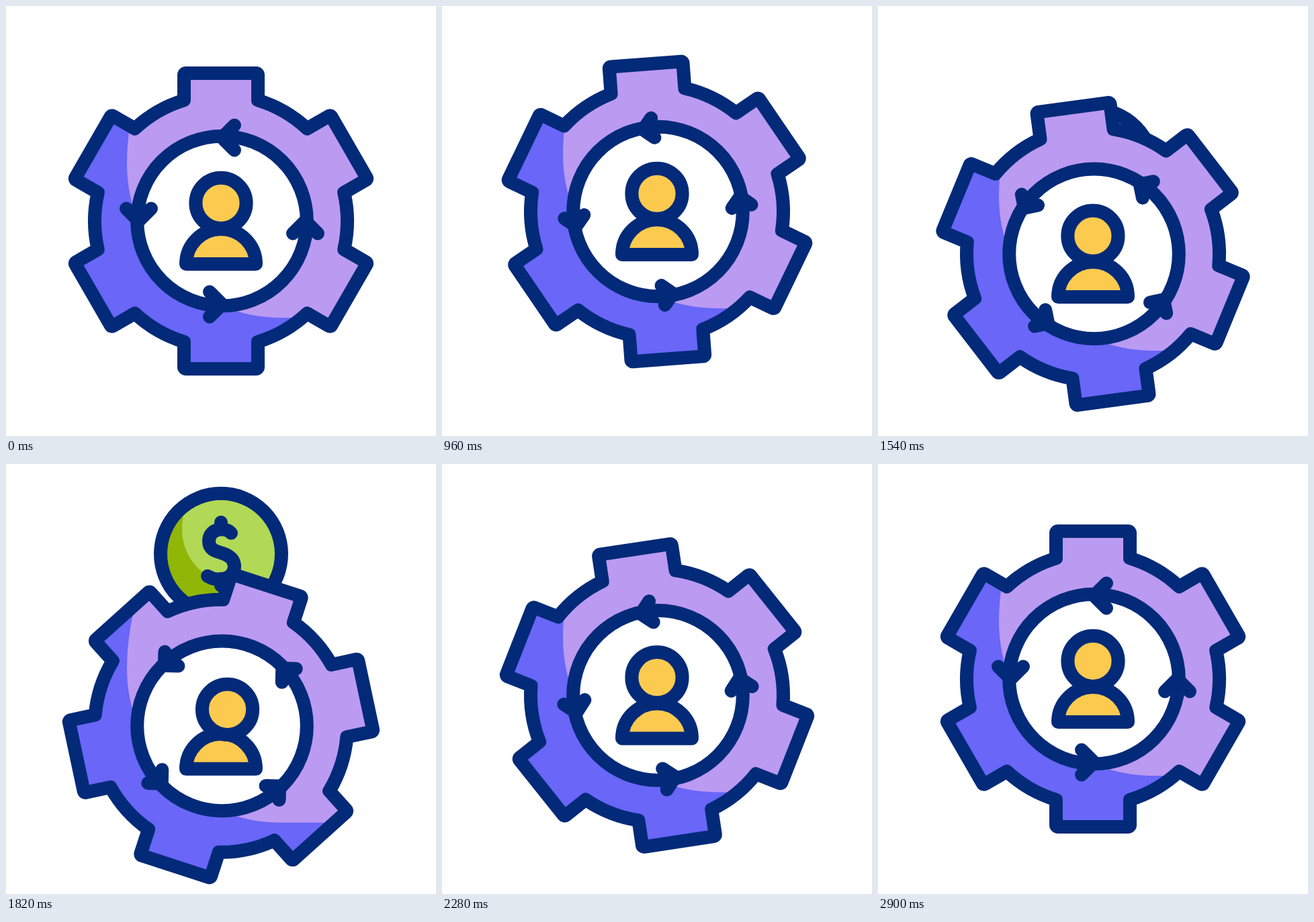
An HTML page with a canvas for the animation above (3280 ms loop, 640 by 640 pixels).

```html
<!DOCTYPE html>
<html lang="en">
<head>
<meta charset="utf-8">
<title>Gear and coin</title>
<style>
html, body { margin: 0; width: 100%; height: 100%; overflow: hidden; background: #fff; }
canvas { display: block; width: 640px; height: 640px; }
</style>
</head>
<body>
<canvas id="stage" width="640" height="640"></canvas>
<script>
const ctx = document.getElementById('stage').getContext('2d');
const LOOP = 3280, TAU = Math.PI * 2, RAD = Math.PI / 180;
const NAVY = '#032a78', LILAC = '#bb9af2', VIOLET = '#6966f8', YELLOW = '#fdca50',
      LIME = '#b1d955', OLIVE = '#90b608';

// Each track is a list of [time in ms, value], eased between entries.
const tracks = {
  y: [[362, 320], [650, 295.5], [2020, 394], [2506, 306], [2900, 320]],
  gear: [[320, 0], [650, 4.8], [2350, -129], [2900, -120]],
  arrows: [[320, 0], [695, 5], [2335, -282.5], [2900, -270]],
  arrowSize: [[320, 18.5], [650, 21.5], [1000, 14.5], [1850, 14.5], [2900, 18.5]],
  headX: [[960, 0], [1290, -9.3], [1800, 9.6], [2240, 0]],
  coinY: [[1240, 320], [1930, 124], [2040, 109], [2380, 320]]
};

function ease(x) {
  let lo = 0, hi = 1, s = x;
  for (let i = 0; i < 18; i++) {
    s = (lo + hi) / 2;
    const r = 1 - s;
    if (1.26 * s * r * r + 1.74 * s * s * r + s * s * s < x) lo = s; else hi = s;
  }
  return s * s * (3 - 2 * s);
}

function valueAt(name, t) {
  const keys = tracks[name];
  if (t <= keys[0][0]) return keys[0][1];
  for (let i = 1; i < keys.length; i++) {
    const [t0, v0] = keys[i - 1], [t1, v1] = keys[i];
    if (t < t1) return v0 + (v1 - v0) * ease((t - t0) / (t1 - t0));
  }
  return keys[keys.length - 1][1];
}

function circle(x, y, r) {
  const p = new Path2D();
  p.arc(x, y, r, 0, TAU);
  return p;
}

function polar(r, a) {
  return [r * Math.cos(a), r * Math.sin(a)];
}

function gearPath(turn) {
  const p = new Path2D(), root = 188, half = 55, top = 220;
  const rootAngle = Math.asin(half / root);
  const tip = Math.hypot(half, top), tipAngle = Math.atan2(half, top);
  for (let k = 0; k < 6; k++) {
    const a = (turn - 90 + k * 60) * RAD;
    const left = polar(tip, a - tipAngle), right = polar(tip, a + tipAngle);
    if (k === 0) p.moveTo(...polar(root, a - rootAngle));
    p.arcTo(...left, ...right, 2.5);
    p.arcTo(...right, ...polar(root, a + rootAngle), 2.5);
    p.lineTo(...polar(root, a + rootAngle));
    p.arc(0, 0, root, a + rootAngle, a + 60 * RAD - rootAngle);
  }
  p.closePath();
  return p;
}

// Lit area: rounded on the lower left, open to the upper right.
function lightPath(x, y, r, stretch) {
  const p = new Path2D();
  p.moveTo(x + 2 * r, y + r);
  p.lineTo(x, y + r);
  p.arc(x, y, r, Math.PI / 2, Math.PI);
  p.ellipse(x, y, r, r * stretch, 0, Math.PI, Math.PI * 1.5);
  p.lineTo(x + 2 * r, y - r * stretch);
  p.closePath();
  return p;
}

function fillStroke(path, color) {
  ctx.fillStyle = color;
  ctx.fill(path);
  ctx.stroke(path);
}

function twoTone(path, light, dark, lit) {
  ctx.save();
  ctx.clip(path);
  ctx.fillStyle = dark;
  ctx.fillRect(-300, -300, 600, 600);
  ctx.fillStyle = light;
  ctx.fill(lit);
  ctx.restore();
  ctx.stroke(path);
}

const person = new Path2D('M-52 64 A52 52 0 0 1 52 64 Z');
const dollar = new Path2D(
  'M15 -31 C6 -41 -18 -38 -18 -19 C-18 -5 -6 -4 2 -1 C11 2 20 7 20 19 ' +
  'C20 37 -4 43 -20 33 M0 -47 V-37 M0 37 V47');
const gearLight = lightPath(89, -85, 229, 1.27);
const coinLight = lightPath(22, -36, 80, 1.27);
const coinDisc = circle(0, 0, 90);

function at(x, y, paint) {
  ctx.save();
  ctx.translate(x, y);
  paint();
  ctx.restore();
}

function drawCoin() {
  twoTone(coinDisc, LIME, OLIVE, coinLight);
  ctx.stroke(dollar);
}

function drawArrows(turn, size) {
  for (let k = 0; k < 4; k++) {
    ctx.save();
    ctx.rotate((turn + k * 90) * RAD);
    ctx.beginPath();
    ctx.moveTo(size, -124 - size);
    ctx.lineTo(0, -124);
    ctx.lineTo(size, -124 + size);
    ctx.stroke();
    ctx.restore();
  }
}

function draw(t) {
  const get = name => valueAt(name, t);
  ctx.fillStyle = '#fff';
  ctx.fillRect(0, 0, 640, 640);
  ctx.strokeStyle = NAVY;
  ctx.lineWidth = 20;
  ctx.lineCap = ctx.lineJoin = 'round';

  const coinY = get('coinY');
  if (coinY < 320) at(320, coinY, drawCoin);

  const y = get('y');
  at(320, y, () => twoTone(gearPath(get('gear')), LILAC, VIOLET, gearLight));
  at(321.5, y, () => {
    fillStroke(circle(0, 0, 126.3), '#fff');
    drawArrows(get('arrows'), get('arrowSize'));
  });
  at(320, y, () => {
    const headX = get('headX');
    fillStroke(person, YELLOW);
    fillStroke(circle(headX, -26.7 + Math.abs(headX) * 0.23, 37.6), YELLOW);
  });
}

function tick() {
  draw(performance.now() % LOOP);
  requestAnimationFrame(tick);
}
tick();
</script>
</body>
</html>
```
